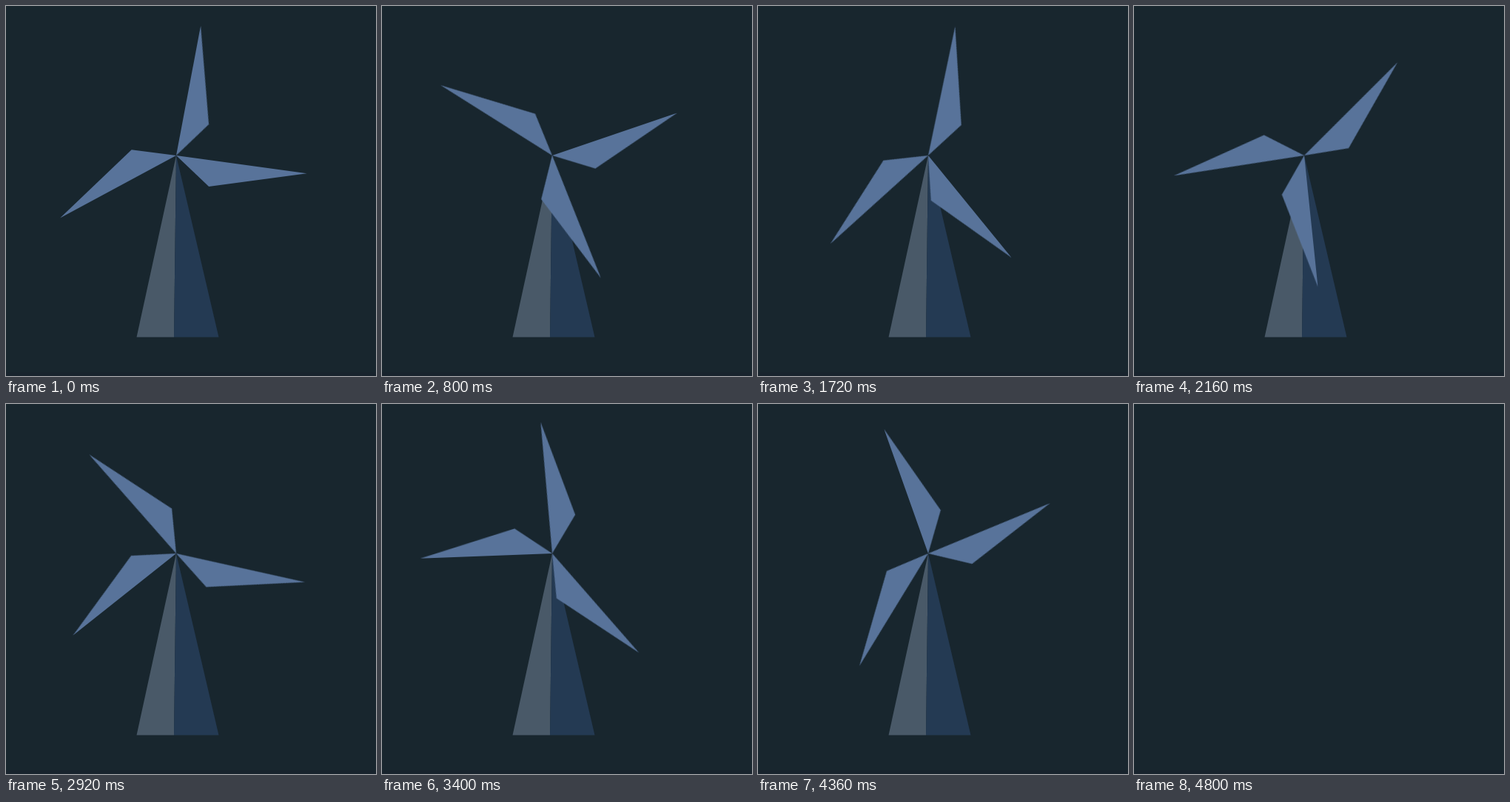
An HTML page for the animation above (4840 ms loop, 500 by 500 pixels).

```html
<!DOCTYPE html>
<html lang="en">
<head>
<meta charset="utf-8">
<title>Wind turbine</title>
<style>
  html, body { margin: 0; width: 100%; height: 100%; overflow: hidden; background: #18262e; }
  svg { display: block; width: 100%; height: 100%; }
</style>
</head>
<body>
<svg viewBox="0 0 500 500">
  <defs>
    <path id="blade" d="M0 0 L0 -178.2 L35.5 -49.4 Z"/>
  </defs>
  <rect width="500" height="500" fill="#18262e"/>
  <rect y="495" width="500" height="5" fill="#18232d"/>
  <g id="turbine">
    <path d="M230 202 L176.5 447.5 H227 Z" fill="#495968"/>
    <path d="M230 202 L227 447.5 H287.5 Z" fill="#243a53"/>
    <g transform="translate(230 202)" fill="#58739a">
      <g id="rotor">
        <use href="#blade" transform="rotate(10.7)"/>
        <use href="#blade" transform="rotate(97.8)"/>
        <use href="#blade" transform="rotate(241.7)"/>
      </g>
    </g>
  </g>
</svg>
<script>
  const LOOP = 4840, STEP = 40, TURN = 4760, HIDE = 4800;
  const timing = { duration: LOOP, iterations: Infinity };
  const play = (id, frames) => {
    const anim = document.getElementById(id).animate(frames, timing);
    anim.startTime = document.timeline.currentTime;
  };

  // One full turn in discrete steps, then a short blank before the loop restarts.
  play('rotor', [
    { offset: 0, transform: 'rotate(0deg)', easing: `steps(${TURN / STEP}, end)` },
    { offset: TURN / LOOP, transform: 'rotate(360deg)' },
    { offset: 1, transform: 'rotate(360deg)' }
  ]);
  play('turbine', [
    { offset: 0, opacity: 1 },
    { offset: HIDE / LOOP, opacity: 1 },
    { offset: HIDE / LOOP, opacity: 0 },
    { offset: 1, opacity: 0 }
  ]);
</script>
</body>
</html>
```
